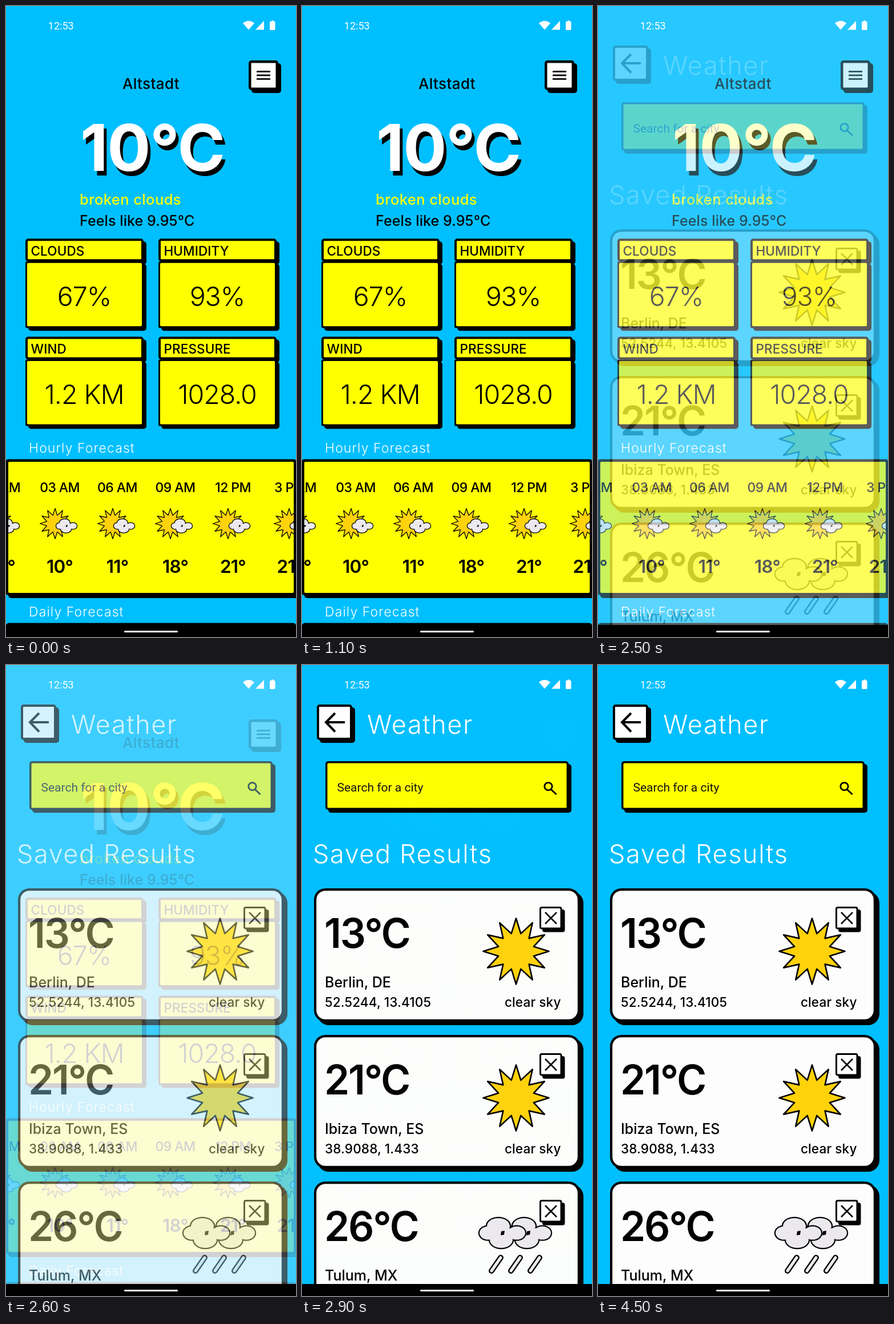
Animation of 508x1102 px, one loop 4600 ms. Source, as an HTML page:

```html
<!DOCTYPE html>
<html lang="en">
<head>
<meta charset="utf-8">
<title>Weather app</title>
<style>
  html, body { margin: 0; width: 100%; height: 100%; overflow: hidden; background: #fff; }
  svg { display: block; width: 100vw; height: 100vh; }
  text { font-family: Inter, "Open Sans", sans-serif; white-space: pre; }
  .system { font-family: Roboto, "Noto Sans", sans-serif; }
  .line { fill: none; stroke: #000; }
  .body { font-size: 25px; font-weight: 500; }
  .small { font-size: 22.6px; font-weight: 500; letter-spacing: .1px; }
  .label { font-size: 22.5px; font-weight: 550; letter-spacing: .1px; }
  .value { font-size: 46.5px; font-weight: 360; letter-spacing: -1px; }
  .section { font-size: 23px; font-weight: 360; letter-spacing: 1.1px; fill: #fff; }
  .title { font-size: 45px; font-weight: 340; letter-spacing: 1.6px; fill: #fff; }
  .hour { font-size: 23px; font-weight: 500; letter-spacing: -.6px; }
  .degree { font-size: 31.5px; font-weight: 600; letter-spacing: -.8px; }
  .temp { font-size: 71px; font-weight: 600; letter-spacing: -2.2px; }
  .huge { font-size: 113px; font-weight: 700; letter-spacing: -1.5px; }
  .mid { text-anchor: middle; }
  .end { text-anchor: end; }
</style>
</head>
<body>
<svg id="stage" viewBox="0 0 508 1102" preserveAspectRatio="none"></svg>
<script>
const LOOP = 4600;
const BLUE = '#00bfff', YELLOW = '#ff0', SUN = '#ffd20a', CLOUD = '#ebe9ed';

// [time in ms, share of the search screen]
const FADE = [[0, 0], [2500, .2], [2600, .59], [2700, .86], [2800, .94], [2900, .985], [3000, 1]];

const text = (x, y, cls, str, extra = '') => `<text x="${x}" y="${y}" class="${cls}" ${extra}>${str}</text>`;
const rect = (x, y, w, h, r, fill) => `<rect x="${x}" y="${y}" width="${w}" height="${h}" rx="${r}" fill="${fill}"/>`;
const line = (d, width, extra = '') => `<path class="line" d="${d}" stroke-width="${width}" ${extra}/>`;

// Filled box with a black border and a hard drop shadow
const box = (x, y, w, h, r, border, fill, drop = 5) =>
  rect(x + drop, y + drop, w, h, r, '#000') +
  rect(x, y, w, h, r, '#000') +
  rect(x + border, y + border, w - 2 * border, h - 2 * border, Math.max(r - border, 1), fill);

function sun(cx, cy, outer, inner, width) {
  const points = Array.from({ length: 24 }, (_, i) => {
    const a = i * Math.PI / 12, r = i % 2 ? inner : outer;
    return `${(cx + r * Math.sin(a)).toFixed(2)},${(cy - r * Math.cos(a)).toFixed(2)}`;
  });
  return `<polygon points="${points.join(' ')}" fill="${SUN}" stroke="#000" stroke-width="${width}" stroke-linejoin="round"/>`;
}

function cloud(cx, cy, scale, width) {
  const lobes = [[-7, -12, 20, 14], [-25, 0, 15, 11.5], [25, 0, 15, 11.5], [-2, 12, 20, 14]];
  const draw = attrs => lobes.map(([x, y, rx, ry]) =>
    `<ellipse cx="${x}" cy="${y}" rx="${rx}" ry="${ry}" ${attrs}/>`).join('');
  return `<g transform="translate(${cx} ${cy}) scale(${scale})">` +
    draw(`stroke="#000" stroke-width="${2 * width / scale}"`) + draw(`fill="${CLOUD}"`) +
    `<rect x="-20" y="-8" width="40" height="16" fill="${CLOUD}"/>` +
    `<path d="M-2-3L4-4L3 3L-3 4Z"/></g>`;
}

const rain = x =>
  line(`M${x + 8} 1035L${x - 8} 1058`, 10, 'stroke-linecap="round"') +
  line(`M${x + 8} 1035L${x - 8} 1058`, 5, `stroke-linecap="round" style="stroke:${CLOUD}"`);

function metric(x, y, label, value) {
  return box(x, y, 207, 40, 5, 4, YELLOW) +
    rect(x + 5, y + 44, 207, 117, 5, '#000') +
    rect(x, y + 40, 207, 116, 2, '#000') +
    rect(x + 3, y + 42.5, 201, 110.5, 2, YELLOW) +
    text(x + 9.5, y + 29.5, 'label', label) +
    text(x + 103, y + 117.5, 'value mid', value);
}

function hour([left, center, label, degree]) {
  return text(center, 849, 'hour mid', label) +
    sun(left + 27, 904, 26.5, 15, 1.3) +
    cloud(left + 47, 908, .45, 1.3) +
    text(center, 990, 'degree mid', degree);
}

function home() {
  const hours = [
    [-42, -7, '12 AM', '10°'], [59, 94, '03 AM', '10°'], [160, 195, '06 AM', '11°'],
    [261, 296.5, '09 AM', '18°'], [362, 397.5, '12 PM', '21°'], [469, 497, '3 PM', '21°']
  ];
  return rect(0, 0, 508, 1102, 0, BLUE) +
    box(425, 95, 52, 52, 5, 4.5, '#fff') +
    [114.5, 121, 127.5].map(y => line(`M439 ${y}H463`, 2.7)).join('') +
    text(254, 145, 'body mid', 'Altstadt', 'style="font-size:26px;letter-spacing:.4px"') +
    text(135, 296, 'huge', '10°C') +
    text(130, 288, 'huge', '10°C', 'fill="#fff"') +
    text(129, 347, 'body', 'broken clouds', `fill="${YELLOW}" style="font-size:25.5px;letter-spacing:.4px"`) +
    text(129, 384, 'body', 'Feels like 9.95°C', 'style="letter-spacing:.1px"') +
    metric(34, 406.3, 'CLOUDS', '67%') +
    metric(267, 406.3, 'HUMIDITY', '93%') +
    metric(34, 577.5, 'WIND', '1.2 KM') +
    metric(267, 577.5, 'PRESSURE', '1028.0') +
    text(40, 780, 'section', 'Hourly Forecast') +
    rect(4, 800, 510, 234, 5, '#000') +
    rect(0, 791.6, 508, 237.4, 4, '#000') +
    rect(4, 796, 500, 229, 2, YELLOW) +
    `<g clip-path="url(#panel)">${hours.map(hour).join('')}</g>` +
    text(40, 1066, 'section', 'Daily Forecast') +
    rect(0, 1077.5, 508, 30, 5, '#000');
}

function card(i, temp, place, coords) {
  const y = 390 + 256 * i;
  const icon = i < 2
    ? sun(375, y + 110, 57.5, 32, 2.6) + text(453.5, y + 207, 'small end', 'clear sky')
    : cloud(396, 992, 1, 2.2) + cloud(351, 992, 1, 2.2) + [340, 374, 408].map(rain).join('');
  return box(21, y, 466, 233, 20, 4.2, '#fdfdfd', 6) +
    text(39, y + 104, 'temp', temp) +
    text(40, y + 173, 'body', place) +
    text(40, y + 207, 'small', coords) +
    icon +
    box(416, y + 32, 39.5, 39.5, 4, 3, '#fff') +
    line(`M426 ${y + 42}l20 20m0-20l-20 20`, 2.6);
}

function search() {
  return rect(0, 0, 508, 1102, 0, BLUE) +
    box(26, 69, 62, 62, 5, 4, '#fff') +
    line('M75 100H42M58 84L42 100L58 116.5', 4) +
    text(114, 120, 'title', 'Weather') +
    box(41, 168, 426, 85, 5, 3.5, YELLOW) +
    text(61.5, 221, 'system', 'Search for a city', 'font-size="21" fill="#111"') +
    '<circle class="line" cx="431.5" cy="212" r="6.7" stroke-width="2.8"/>' +
    line('M436 217L445.5 226', 3) +
    text(19, 346, 'title', 'Saved Results') +
    card(0, '13°C', 'Berlin, DE', '52.5244, 13.4105') +
    card(1, '21°C', 'Ibiza Town, ES', '38.9088, 1.433') +
    card(2, '26°C', 'Tulum, MX', '');
}

const systemBars =
  text(73.8, 40.5, 'system', '12:53', 'font-size="18" fill="#fff"') +
  '<path fill="#fff" d="M415 30Q425 22 435 30L425 41.5ZM437 41.5H452V26ZM462 28.5Q462 27 463.5 27H465V25.5H469V27H470Q471.5 27 471.5 28.5V40.5Q471.5 42 470 42H463.5Q462 42 462 40.5Z"/>' +
  rect(0, 1081, 508, 21, 0, '#000') +
  rect(207, 1091, 94, 3, 1.5, '#fff');

document.getElementById('stage').innerHTML =
  '<defs><clipPath id="panel"><rect x="4" y="795" width="500" height="230"/></clipPath></defs>' +
  rect(0, 0, 508, 1102, 0, '#fff') +
  `<g id="home">${home()}</g><g id="search">${search()}</g>` + systemBars;

const homeLayer = document.getElementById('home');
const searchLayer = document.getElementById('search');

function draw() {
  const t = performance.now() % LOOP;
  const share = FADE.filter(([start]) => start <= t).pop()[1];
  homeLayer.setAttribute('opacity', 1 - share);
  searchLayer.setAttribute('opacity', share);
  requestAnimationFrame(draw);
}
draw();
</script>
</body>
</html>
```
